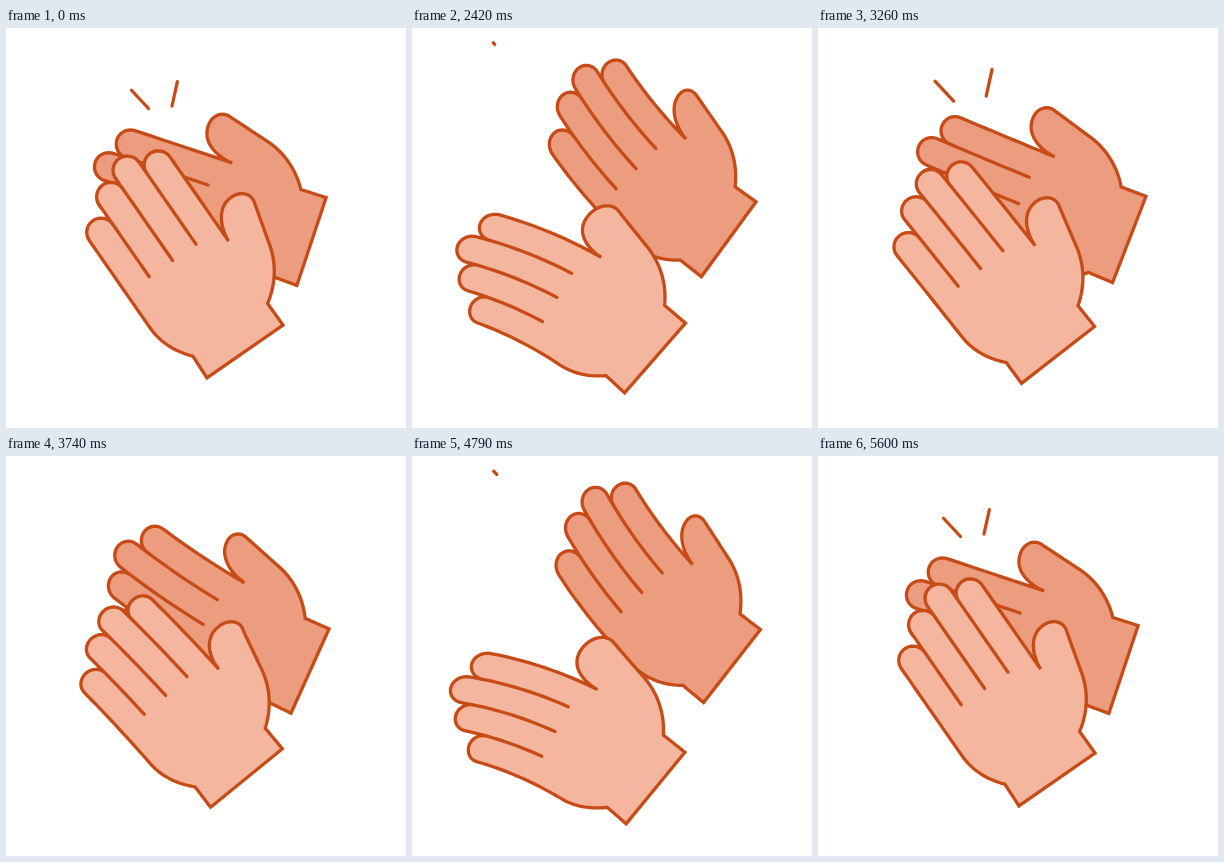
These frames come from a looping animation (400 px wide and 400 px high, 5.63 s). An HTML page with a canvas:

```html
<!DOCTYPE html>
<html lang="en">
<head>
<meta charset="utf-8">
<title>Clapping hands</title>
<style>
  html, body { margin: 0; width: 100%; height: 100%; overflow: hidden; background: #fff; }
  canvas { display: block; width: 400px; height: 400px; }
</style>
</head>
<body>
<canvas id="stage" width="400" height="400"></canvas>
<script>
const ctx = document.getElementById('stage').getContext('2d');
const LOOP = 5630, HOLD = 2030, STEP = 30, CLAP = 600, CLAPS = 6;
const INK = '#c74b16';

// One clap: time, wrist x, wrist y, angle, bend, finger shortening
const FRONT = [
  [0, 239, 323.5, -34.8, 0, 0],
  [30, 239.4, 324, -34.9, 0, 0],
  [150, 242, 336, -47.6, 6, 8],
  [270, 244, 338.5, -52, 23, 3],
  [390, 243.5, 332, -50.6, 26, 0],
  [540, 240.5, 322, -39.2, 6, 8],
  [600, 239, 323.5, -34.8, 0, 0]
];
const BACK = [
  [0, 305.5, 213.5, -71.6, 0, 0],
  [30, 306.5, 213.2, -71.5, 0, 0],
  [150, 326, 206, -60.1, -8, 0],
  [270, 331, 204.5, -54.5, -15, 0],
  [390, 320, 210, -52.1, -20, 0],
  [540, 304, 215, -65.7, -12, 0],
  [600, 305.5, 213.5, -71.6, 0, 0]
];
// Spark: time, head distance, tail distance
const SPARK = [[0, 25, 0], [30, 28.5, 2.3], [150, 65.3, 36], [270, 84, 66], [390, 89.5, 85], [450, 90, 90]];
const RAYS = [[142.5, 80.5, -0.68, -0.73], [166, 78, 0.215, -0.977]];

// Smooth curve through the rows of a table
function sample(rows, t) {
  const last = rows.length - 1;
  let i = 0;
  while (i < last - 1 && t > rows[i + 1][0]) i++;
  const a = rows[i], b = rows[i + 1];
  const p = rows[Math.max(i - 1, 0)], q = rows[Math.min(i + 2, last)];
  const d = b[0] - a[0], u = (t - a[0]) / d;
  return a.slice(1).map((v, k) => {
    const c = k + 1;
    const m0 = (b[c] - p[c]) / (b[0] - p[0]) * d;
    const m1 = (q[c] - a[c]) / (q[0] - a[0]) * d;
    const e = b[c] - v;
    return v + u * (m0 + u * (3 * e - 2 * m0 - m1 + u * (m0 + m1 - 2 * e)));
  });
}

// Hand built upright: wrist at the origin, thumb on the right
function line(pts, x, y) {
  const [x0, y0] = pts[pts.length - 1];
  for (let i = 1; i <= 16; i++) pts.push([x0 + (x - x0) * i / 16, y0 + (y - y0) * i / 16]);
}
function curve(pts, x1, y1, x2, y2, x, y) {
  const [x0, y0] = pts[pts.length - 1];
  for (let i = 1; i <= 16; i++) {
    const u = i / 16, w = 1 - u;
    const mix = (a, b, c, d) => w * w * w * a + 3 * w * w * u * b + 3 * w * u * u * c + u * u * u * d;
    pts.push([mix(x0, x1, x2, x), mix(y0, y1, y2, y)]);
  }
}
function fingertip(pts, x, y, r) {
  line(pts, x - r, y);
  for (let i = 1; i <= 20; i++) {
    const a = Math.PI * (1 - i / 20);
    pts.push([x + r * Math.cos(a), y + r * Math.sin(a)]);
  }
}

const R = 14.25, TIPS = [180, 203.7, 216, 202.5];
const fingerX = i => -50.25 + i * 2 * R;
const outline = [[-46.3, 0]];
line(outline, -45.5, 26);
curve(outline, -56, 38, -64.5, 54, -64.5, 74);
TIPS.forEach((y, i) => fingertip(outline, fingerX(i), y, R));
line(outline, 49.5, 100);
curve(outline, 50, 112, 57, 134, 76, 134.5);
curve(outline, 88, 135, 96, 126, 92.5, 116);
line(outline, 82, 77);
curve(outline, 77, 55, 64, 38, 46, 26.5);
line(outline, 46.3, 0);

const gaps = [0, 1, 2].map(i => {
  const x = fingerX(i) + R, pts = [[x, Math.min(TIPS[i], TIPS[i + 1])]];
  line(pts, x, 116);
  return pts;
});

function bend([x, y], k, short) {
  if (y > 110) y -= short * (y - 110) / 90;
  const s = Math.max(y - 16, 0);
  const c = k * (x > 50 ? 1 - (x - 50) / 80 : 1);
  const f = c * s;
  return [
    x * Math.cos(f) - c * s * s / 2 * (1 - f * f / 12),
    y - s * f * f / 6 + 0.75 * x * Math.sin(f)
  ];
}

function drawHand([px, py, angle, k, short], fill) {
  const a = angle * Math.PI / 180, cos = Math.cos(a), sin = Math.sin(a);
  const trace = pts => {
    ctx.beginPath();
    for (const p of pts) {
      const [x, y] = bend(p, k / 1e4, short);
      ctx.lineTo(px + x * cos + y * sin, py + x * sin - y * cos);
    }
  };
  trace(outline);
  ctx.closePath();
  ctx.fillStyle = fill;
  ctx.fill();
  ctx.stroke();
  for (const g of gaps) {
    trace(g);
    ctx.stroke();
  }
}

function drawSparks(head, tail) {
  if (head - tail < 0.5) return;
  for (const [x, y, dx, dy] of RAYS) {
    ctx.beginPath();
    ctx.moveTo(x + dx * tail, y + dy * tail);
    ctx.lineTo(x + dx * head, y + dy * head);
    ctx.stroke();
  }
}

// The last clap is only a small rebound
function pose(rows, p, final) {
  if (!final) return sample(rows, p);
  const amt = 1.2 * Math.sin(Math.PI * p / CLAP) ** 2;
  const rest = sample(rows, 0), open = sample(rows, 540);
  return rest.map((v, i) => v + amt * (open[i] - v));
}

function sparks(p, final) {
  if (final) return [25, 0];
  if (p >= 540) return [25 * (p - 540) / 60, 0];
  return p < 450 ? sample(SPARK, p) : [0, 0];
}

function draw(ms) {
  const t = ms % LOOP;
  const run = t < HOLD ? 0 : (Math.floor((t - HOLD) / STEP) + 1) * STEP;
  const p = run % CLAP;
  const final = Math.floor(run / CLAP) === CLAPS - 1;
  ctx.fillStyle = '#fff';
  ctx.fillRect(0, 0, 400, 400);
  ctx.strokeStyle = INK;
  ctx.lineWidth = 3.3;
  ctx.lineCap = 'round';
  ctx.lineJoin = 'miter';
  drawHand(pose(BACK, p, final), '#ec9c7f');
  drawHand(pose(FRONT, p, final), '#f4b69e');
  drawSparks(...sparks(p, final));
}

const start = performance.now();
function tick() {
  draw(performance.now() - start);
  requestAnimationFrame(tick);
}
tick();
</script>
</body>
</html>
```
